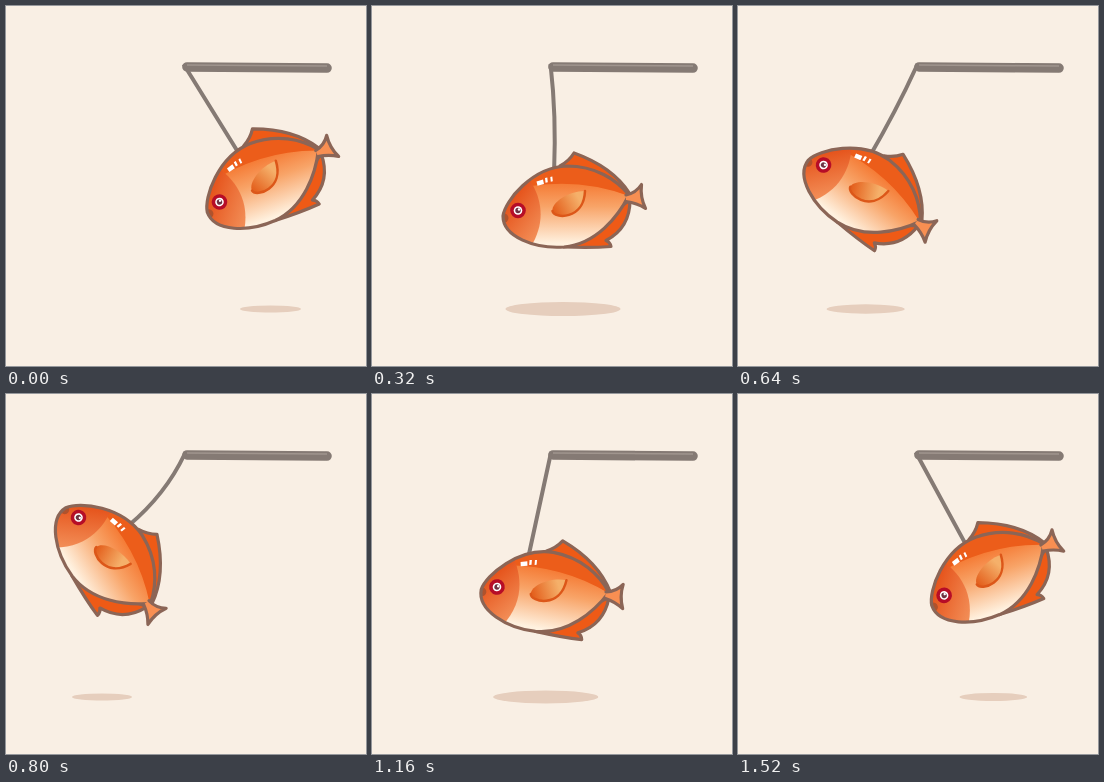
An HTML page for the animation above (1560 ms loop, 360 px wide and 360 px high).

```html
<!DOCTYPE html>
<html lang="en">
<head>
<meta charset="utf-8">
<title>Swinging fish</title>
<style>
  html, body { margin: 0; width: 100%; height: 100%; overflow: hidden; background: #f9efe4; }
  svg { display: block; width: 100vw; height: 100vh; }
  .line { stroke: #8b6556; stroke-width: 3.2; stroke-linejoin: round; stroke-linecap: round; }
</style>
</head>
<body>
<svg viewBox="0 0 360 360">
  <defs>
    <linearGradient id="belly" x1="0" y1="0" x2="0" y2="1">
      <stop offset=".15" stop-color="#f4722a"/>
      <stop offset=".5" stop-color="#f8a468"/>
      <stop offset=".95" stop-color="#fff1df"/>
    </linearGradient>
    <linearGradient id="head" x1="0" y1="0" x2=".6" y2="1">
      <stop offset=".45" stop-color="#e5521a"/>
      <stop offset="1" stop-color="#f28c55"/>
    </linearGradient>
    <linearGradient id="flipper" x1="0" y1=".6" x2="1" y2=".2">
      <stop offset="0" stop-color="#e4621f"/>
      <stop offset=".8" stop-color="#f5b06a"/>
    </linearGradient>
    <path id="body" d="M131 210C133 195 160 161 195 160C223 160 244 173 257 189C246 211 224 238 192 241C163 243 131 231 131 210Z"/>
    <clipPath id="inside"><use href="#body"/></clipPath>
  </defs>

  <ellipse id="shadow" cy="303" fill="#e6cebd"/>

  <path d="M181 61L321 62" stroke="#857a74" stroke-width="9.6" stroke-linecap="round"/>
  <path d="M181 59L321 60" stroke="#a0958e" stroke-width="1.5"/>
  <path id="rope" fill="none" stroke="#857a74" stroke-width="4" stroke-linecap="square"/>

  <g id="fish"><g transform="translate(-146 -204.5)">
    <path class="line" fill="#ee5a16" d="M188 160Q197 155 202 147Q241 161 258 188Z"/>
    <path class="line" fill="#ee5a16" d="M192 241Q220 242 239 240.500Q238 236 234 234.500Q258 222 258 194Z"/>
    <use href="#body" fill="url(#belly)"/>
    <g clip-path="url(#inside)">
      <path fill="#ec5d1a" d="M128 187Q196 167 257 190L240 155H130Z"/>
      <path fill="url(#head)" d="M125 155L145 160C160 172 182 205 158 242L125 246Z"/>
      <circle cx="132" cy="212" r="4.500" fill="#b0522c"/>
    </g>
    <use href="#body" class="line" fill="none"/>
    <path class="line" fill="#f88f52" d="M254 189Q264 187 269.500 178.500Q268 191 273.500 202.500Q265 197 254 195.500"/>
    <path fill="url(#flipper)" d="M213 185C196 185 179 197 180.500 205C182 213 212 214 213 185Z"/>
    <path fill="none" stroke="#dc5719" stroke-width="2.500" stroke-linecap="round" d="M213 185C212 214 182 213 180.500 205"/>
    <path fill="#fff" d="M164.500 175.500L171 173.500L172 178L165.500 179.800ZM173 172L175.300 171.500L175.800 176.300L173.500 176.800ZM178.300 171L180.300 170.500L180.800 175.300L178.800 175.800Z"/>
    <circle cx="146" cy="204.500" r="7.800" fill="#b60d27"/>
    <circle cx="146" cy="204.500" r="4.300" fill="#fff"/>
    <circle cx="146" cy="204.500" r="2.700" fill="#6d3444"/>
    <circle cx="147" cy="203.500" r="1.200" fill="#fff"/>
  </g></g>
</svg>
<script>
const LOOP = 1560, STEP = 40, PIVOT = [178.7, 60];
const $ = id => document.getElementById(id);

// One smooth stroke in each direction, with a turn at both ends.
const strokes = [
  { times: [0, 320, 480, 800], x: [213.5, 146, 112, 72.5], y: [196, 204.5, 187, 123.5],
    turn: [-20, 0, 18, 57.9], ropeX: [232, 182, 154, 124.5], ropeY: [146, 160, 158, 129], bend: [0, 2, 1, 5] },
  { times: [800, 1160, 1360, 1560], x: [72.5, 125, 171.5, 213.5], y: [123.5, 193, 209, 196],
    turn: [57.9, 10.7, -10.55, -20], ropeX: [124.5, 157, 200, 232], ropeY: [129, 160, 160, 146], bend: [5, 0, 0, 0] }
];

// Cubic through four timed values
const cubic = (times, values, t) => values.reduce((sum, v, i) =>
  sum + times.reduce((p, u, j) => j === i ? p : p * (t - u) / (times[i] - u), v), 0);

function linear(times, values, t) {
  const i = Math.max(1, times.findIndex(u => u > t));
  return values[i - 1] + (values[i] - values[i - 1]) * (t - times[i - 1]) / (times[i] - times[i - 1]);
}

function drawShadow(t) {
  const at = values => linear([0, 320, 800, 1240, LOOP], values, t);
  const shadow = $('shadow');
  shadow.setAttribute('cx', at([264.5, 191, 96, 191, 264.5]));
  shadow.setAttribute('rx', at([30.5, 57.5, 30, 57.5, 30.5]));
  shadow.setAttribute('ry', at([3.6, 7, 3.6, 7, 3.6]));
}

function drawFish(t) {
  const s = strokes[t < 800 ? 0 : 1];
  const at = name => cubic(s.times, s[name], t);
  $('fish').setAttribute('transform', `translate(${at('x')} ${at('y')}) rotate(${at('turn')})`);

  const [px, py] = PIVOT, dx = at('ropeX') - px, dy = at('ropeY') - py;
  const bow = 2 * at('bend') / Math.hypot(dx, dy);
  const cx = px + dx / 2 + dy * bow, cy = py + dy / 2 - dx * bow;
  $('rope').setAttribute('d', `M${px} ${py}Q${cx} ${cy} ${px + dx * 1.04} ${py + dy * 1.04}`);
}

function draw() {
  const t = Math.floor((performance.now() + 1) / STEP) * STEP % LOOP;
  drawShadow(t);
  drawFish(t);
  requestAnimationFrame(draw);
}
draw();
</script>
</body>
</html>
```
